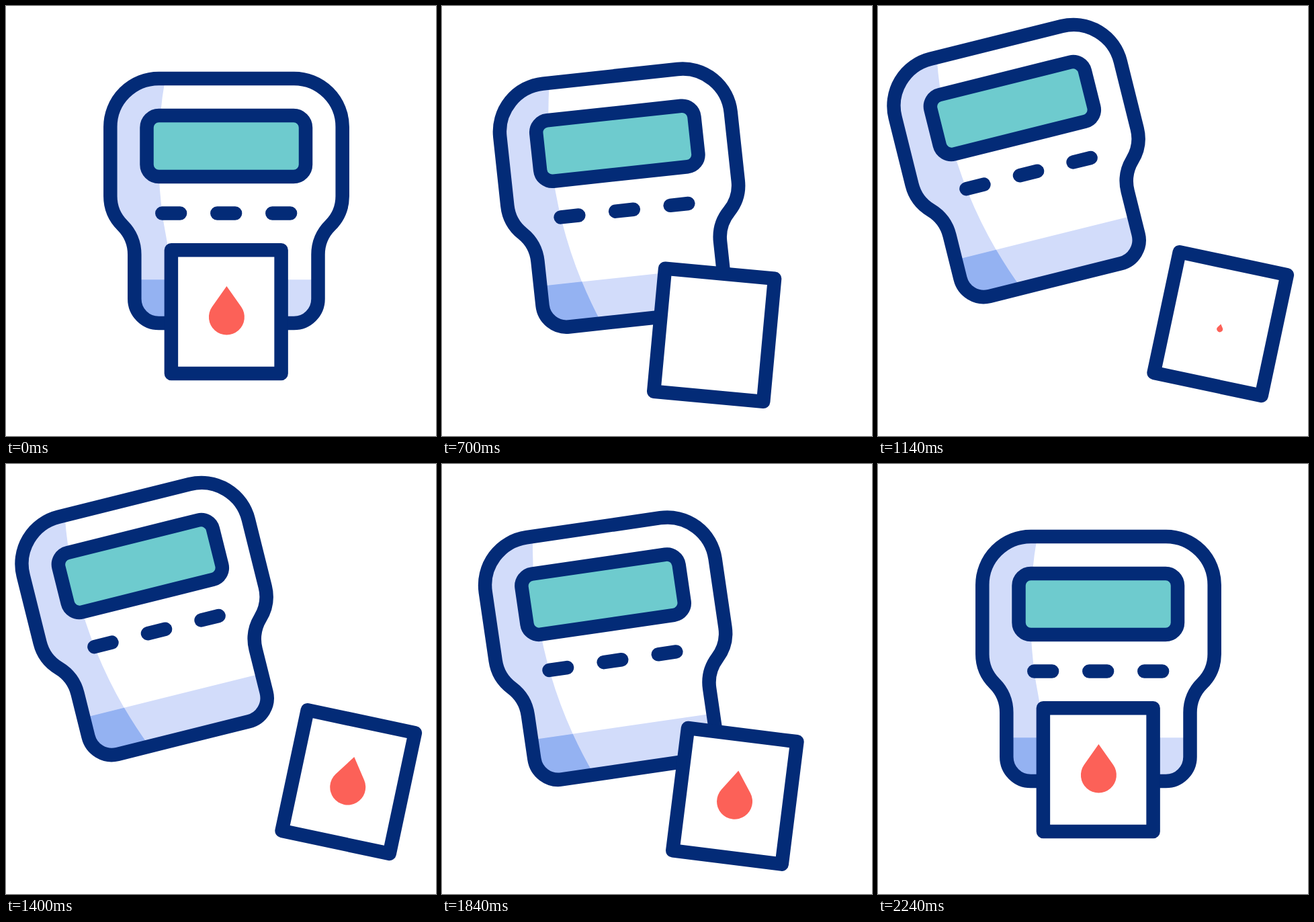
Animation of 640x640 px, one loop 2400 ms. Source, as an HTML page:

```html
<!DOCTYPE html>
<html lang="en">
<head>
<meta charset="utf-8">
<title>Glucose meter</title>
<style>
  html, body { margin: 0; width: 100%; height: 100%; overflow: hidden; background: #fff; }
  svg { display: block; width: 100%; height: 100%; }
  .line { fill: none; stroke: #032b77; stroke-width: 20.5; stroke-linecap: round; stroke-linejoin: round; }
  .tint { fill: #d2dcfa; }
  .deep { fill: #94b2f2; }
</style>
</head>
<body>
<svg viewBox="0 0 640 640">
  <defs>
    <path id="body" d="M227.3 108 H428.7 A72 72 0 0 1 500.7 180 V283
      A61.5 61.5 0 0 1 482.6 326.5 A61.5 61.5 0 0 0 464.5 370 V436
      A36 36 0 0 1 428.5 472 H227.3 A36 36 0 0 1 191.3 436 V370
      A61.5 61.5 0 0 0 173.3 326.5 A61.5 61.5 0 0 1 155.3 283 V180
      A72 72 0 0 1 227.3 108 Z"/>
    <clipPath id="inside"><use href="#body"/></clipPath>
  </defs>
  <g id="device">
    <use href="#body" fill="#fff"/>
    <g clip-path="url(#inside)">
      <path class="tint" d="M237 108 A660 660 0 0 0 276 472 H145 V108 Z"/>
      <path class="tint" d="M145 407.3 H511 V480 H145 Z"/>
      <path class="deep" d="M253.5 407.3 A660 660 0 0 0 276 472 H145 V407.3 Z"/>
    </g>
    <use href="#body" class="line"/>
    <rect class="line" x="209.5" y="163" width="236.5" height="91" rx="18" style="fill:#6ecbce"/>
    <path class="line" d="M232.3 308.5 h26.8 M314.3 308.5 h26.8 M396.3 308.5 h26.8"/>
  </g>
  <g id="strip">
    <rect class="line" x="245.9" y="363.2" width="163.7" height="183.8" style="fill:#fff"/>
  </g>
  <path id="drop" fill="#fc6158" d="M0 -46 L21.7 -15.2 A26.5 26.5 0 1 1 -21.7 -15.2 Z"/>
</svg>
<script>
  const LOOP = 2400;
  const [device, strip, drop] = ["device", "strip", "drop"].map(id => document.getElementById(id));

  const ease = (t, from, to) => {
    const u = Math.min(1, Math.max(0, (t - from) / (to - from)));
    return u * u * (3 - 2 * u);
  };
  // Curved travel along one axis, zero at p = 0.
  const travel = (p, a, b, c) => p * (a + b * p + c * p * p);
  const pose = (cx, cy, dx, dy, angle) =>
    `translate(${cx + dx} ${cy + dy}) rotate(${angle}) translate(${-cx} ${-cy})`;

  function draw(t) {
    const p = ease(t, 375, 1085) - ease(t, 1530, 2240);

    device.setAttribute("transform", pose(327.8, 308.5,
      travel(p, -125.7, -27, 49), travel(p, 46, -144.3, 38.8), -14 * p));

    const stripPose = pose(327.8, 455,
      travel(p, 140, 115, -73), travel(p, 99, -18, -63), 12 * p);
    strip.setAttribute("transform", stripPose);

    if (t < 900) {
      const fall = ease(t, 210, 690);
      drop.setAttribute("transform", `translate(${328.4 + 14 * fall} ${463 + 233 * fall})`);
    } else {
      drop.setAttribute("transform", `${stripPose} translate(328.4 463) scale(${ease(t, 1050, 1400)})`);
    }
  }

  const start = performance.now();
  function tick() {
    draw((performance.now() - start) % LOOP);
    requestAnimationFrame(tick);
  }
  draw(0);
  requestAnimationFrame(tick);
</script>
</body>
</html>
```
